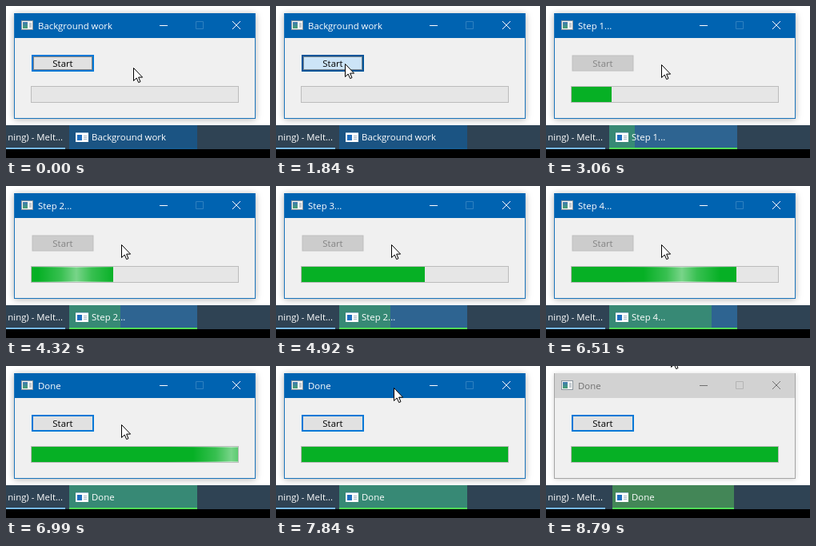
Write an HTML page that moves like this. It is 330 px wide and 190 px high and loops after 9.43 s.

```html
<!DOCTYPE html>
<html lang="en">
<head>
<meta charset="utf-8">
<title>Background work</title>
<style>
html, body { margin: 0; width: 100%; height: 100%; overflow: hidden; background: #fff; }
svg { display: block; width: 330px; height: 190px; }
text { font: 11.4px "Open Sans", "Noto Sans", sans-serif; fill: #fff; white-space: pre; }
.frame { fill: #f0f0f0; stroke: #1a74bb; filter: drop-shadow(0 1px 4px rgba(0,0,0,.2)) drop-shadow(0 1px 5px rgba(0,0,0,.1)); }
.bar { fill: #0063b1; }
.glyph { fill: none; stroke: #fff; }
.max { stroke: #2f80c0; }
.idle .frame { stroke: #a5a5a5; filter: drop-shadow(0 1px 3px rgba(0,0,0,.16)); }
.idle .bar { fill: #d2d2d2; }
.idle .caption { fill: #707070; }
.idle .glyph { stroke: #707070; }
.idle .max { stroke: #b4b4b4; }
.face { fill: #e1e1e1; stroke: #0078d7; stroke-width: 2; }
.label { fill: #000; text-anchor: middle; }
.dots { fill: none; stroke: #222; stroke-dasharray: 1 1; visibility: hidden; }
.focus .dots, .hover .dots, .press .dots { visibility: visible; }
.hover .face { fill: #e5f1fb; }
.press .face { fill: #cce4f7; stroke: #005499; }
.off .face { fill: #ccc; stroke: #bfbfbf; stroke-width: 1; }
.off .label { fill: #838383; }
</style>
</head>
<body>
<svg viewBox="0 0 330 190">
  <defs>
    <linearGradient id="shine">
      <stop offset="0" stop-color="#fff" stop-opacity="0"/>
      <stop offset=".3" stop-color="#fff" stop-opacity=".2"/>
      <stop offset=".5" stop-color="#fff" stop-opacity=".46"/>
      <stop offset=".7" stop-color="#fff" stop-opacity=".2"/>
      <stop offset="1" stop-color="#fff" stop-opacity="0"/>
    </linearGradient>
    <linearGradient id="pane" x2="0" y2="1">
      <stop offset="0" stop-color="#3f78b4"/>
      <stop offset="1" stop-color="#43a070"/>
    </linearGradient>
    <clipPath id="filled"><rect id="clip" x="32" y="101" width="0" height="19"/></clipPath>
  </defs>

  <g id="win">
    <rect class="frame" x="10.5" y="9.5" width="301" height="131"/>
    <rect class="bar" x="11" y="9" width="300" height="31"/>
    <rect x="19.5" y="18.5" width="14" height="11" fill="#f5f5f5" stroke="#8c979f"/>
    <rect x="21" y="20" width="6" height="8" fill="url(#pane)"/>
    <rect x="29" y="21" width="3" height="6" fill="#c5ccd1"/>
    <text class="caption" id="caption" x="40" y="29"></text>
    <path class="glyph" d="M192 24.5h10"/>
    <path class="glyph max" d="M237.500 19.500h9v9h-9z"/>
    <path class="glyph" d="M283 19l10 10M293 19l-10 10"/>
  </g>

  <g id="button">
    <rect class="face" x="33" y="62" width="76" height="19"/>
    <rect class="dots" x="34.5" y="63.500" width="73" height="16"/>
    <text class="label" x="71" y="76">Start</text>
  </g>

  <rect x="31.5" y="100.5" width="259" height="20" fill="#e6e6e6" stroke="#bcbcbc"/>
  <g clip-path="url(#filled)">
    <rect x="32" y="101" width="258" height="19" fill="#06b025"/>
    <g id="glow" fill="url(#shine)">
      <rect x="-48" y="101" width="96" height="19"/>
      <rect x="-80" y="119" width="160" height="1"/>
      <rect x="-80" y="101" width="160" height="1"/>
    </g>
  </g>

  <rect y="149" width="330" height="41" fill="#000"/>
  <rect y="149" width="330" height="30" fill="#2f4354"/>
  <rect y="177" width="74" height="2" fill="#76b9ed"/>
  <text x="71" y="168" text-anchor="end">ning) - Melt...</text>
  <rect id="task" y="149" height="30"/>
  <rect id="taskFill" y="149" height="28"/>
  <rect id="taskLine" y="177" height="2"/>
  <rect x="87" y="158" width="16" height="12" fill="#fff"/>
  <path d="M87 158.500h16" stroke="#a9c3d8"/>
  <rect x="89" y="161" width="6" height="7" fill="#1f6fc0"/>
  <path d="M97 162.500h4M97 164.500h4M97 166.500h4" stroke="#9fb4c4"/>
  <text id="taskText" x="107" y="168"></text>

  <path id="cursor" d="M.5.5v16l3.700-3.500 2.500 5.600 2.300-1-2.400-5.500h5z" fill="#fff" stroke="#000"/>
</svg>
<script>
const LOOP = 9430, TICK = 120;
const el = id => document.getElementById(id);
const set = (id, attrs) => {
  for (const k in attrs) el(id).setAttribute(k, attrs[k]);
};

// Spans in which the screen refreshes every TICK; it rests in between.
const bursts = [
  [0, 0], [870, 1470], [1840, 2440], [2940, 3060], [3930, 3930], [4080, 4920],
  [5040, 5040], [5910, 6750], [6870, 7230], [7600, 7840], [7990, 8470], [8790, 8790]
];
const titles = ["Background work", "Step 0...", "Step 1...", "Step 2...", "Step 3...", "Step 4...", "Done"];
const winTimes = [1960, 2940, 3930, 4920, 5910, 6870];
const taskTimes = [2080, 3060, 4080, 5040, 6030, 6990];

// Pointer moves: start, end, from, to
const moves = [
  [750, 1470, [159, 77], [86, 72]],
  [1960, 2440, [86, 72], [144, 73]],
  [7480, 7840, [144, 73], [147, 27]],
  [7870, 8470, [147, 27], [156, -15]]
];

function snap(t) {
  const [a, b] = bursts.filter(s => s[0] <= t).pop();
  return Math.min(b, a + Math.floor((t - a) / TICK) * TICK);
}

const passed = (times, t) => times.filter(x => x <= t).length;

function pointer(t) {
  const [a, b, from, to] = moves.filter(m => m[0] <= t).pop() || moves[0];
  const p = Math.max(0, Math.min(1, (t - a) / (b - a)));
  const e = p * p * (3 - 2 * p);
  return from.map((v, i) => Math.round(v + (to[i] - v) * e));
}

function buttonState(t, x) {
  if (t >= 6870) return "";
  if (t >= 1960) return "off";
  if (t >= 1840) return "press";
  return x < 110 ? "hover" : "focus";
}

function glowX(t) {
  if (t >= 4080 && t < 4920) return 32 + (t - 4080) * .233;
  if (t >= 5910 && t < 7230) return 30 + (t - 5910) * .233;
  return -200;
}

function draw(t) {
  const step = passed(winTimes, t), task = passed(taskTimes, t);
  const idle = t >= 8790, [x, y] = pointer(t);

  set("win", { class: idle ? "idle" : "" });
  el("caption").textContent = titles[step];
  set("button", { class: buttonState(t, x) });
  set("clip", { width: step > 1 ? 52 * (step - 1) - 2 : 0 });
  set("glow", { transform: `translate(${glowX(t)} 0)` });

  const left = idle ? 83 : 79, width = idle ? 152 : 160, busy = task > 1;
  set("task", { x: left, width, fill: busy ? "#2e6491" : "#1b5483" });
  set("taskFill", { x: left, width: busy ? width * (task - 1) / 5 : 0, fill: idle ? "#438657" : "#378975" });
  set("taskLine", { x: left, width, fill: busy ? "#4fdc58" : "#185a8e" });
  el("taskText").textContent = titles[task];

  set("cursor", { transform: `translate(${x} ${y})` });
}

function loop() {
  draw(snap(performance.now() % LOOP));
  requestAnimationFrame(loop);
}
loop();
</script>
</body>
</html>
```
